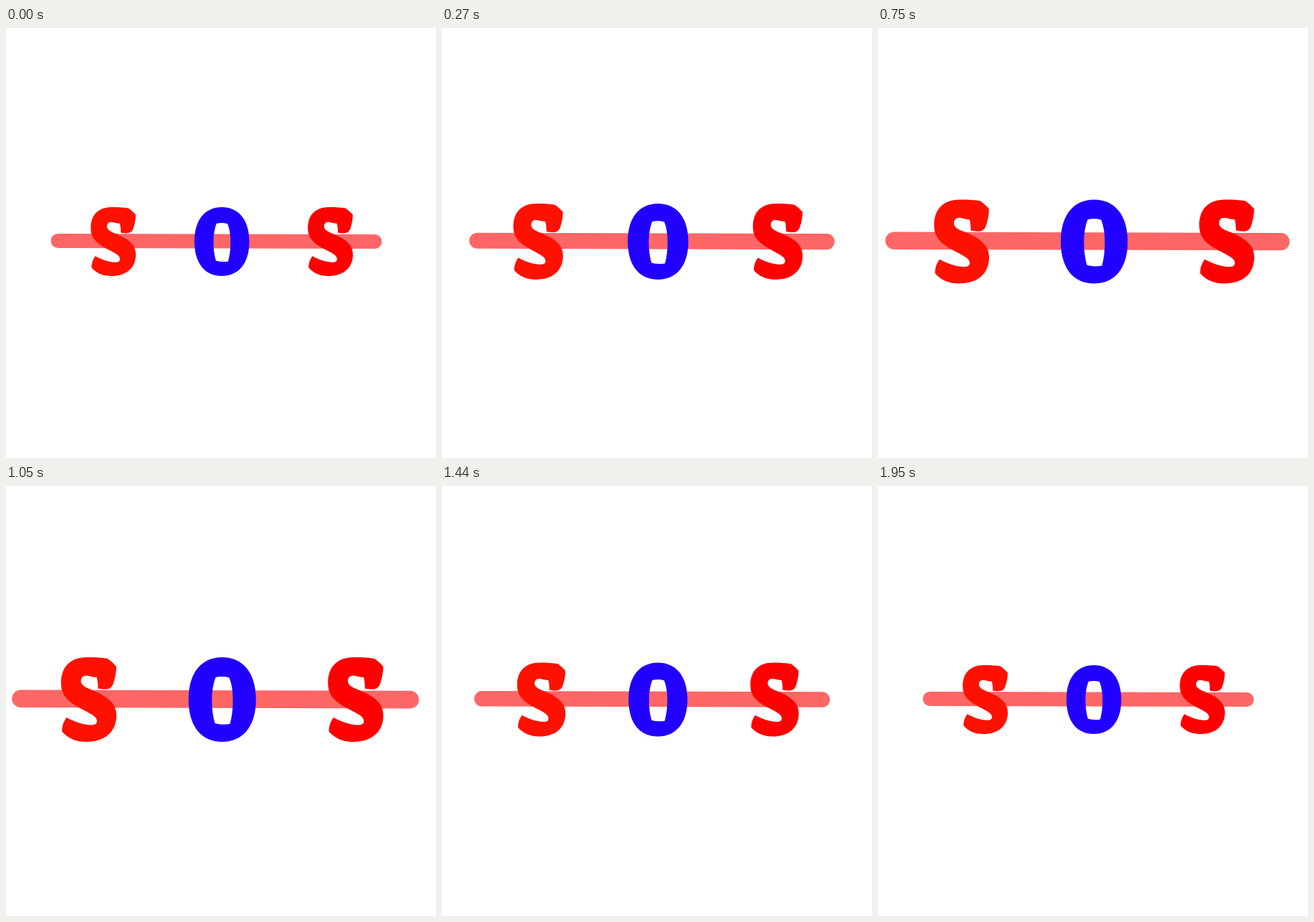
Animation, 600 px wide and 600 px high, one loop 2070 ms. Source, as an HTML page with a canvas:

```html
<!DOCTYPE html>
<html lang="en">
<head>
<meta charset="utf-8">
<title>SOS</title>
<style>
html, body { margin: 0; width: 100%; height: 100%; overflow: hidden; background: #fff; }
canvas { display: block; width: 600px; height: 600px; }
</style>
</head>
<body>
<canvas id="stage" width="600" height="600"></canvas>
<script>
const ctx = document.getElementById('stage').getContext('2d');
const LOOP = 2070, HALF = LOOP / 2, STEP = 30, REST = 1950, LEAD = 7;
const GROWTH = 0.232, PEAK = 1.23;
const CX = 299, CY = 298;

// Letter shapes at their largest size
const S = new Path2D(`M112 239 C123 238.8 134 239.5 141.5 240.8
  C146 244 150 247.5 153.8 252 C154 260 152 269 149.5 276
  C147.5 281.5 144 283.5 139 283.6 C135 283.7 132 283.3 128.3 282.5
  C128.3 277 127.8 272 126.6 267 C120 266.4 116 265 112 264.4
  C107 264.4 104.5 268 104.5 272 C104.5 277.5 110 280.5 117 283.5
  C138 292 154 301 154 320 C154 343 138 357 112 357
  C96 357 85 351 78 342.5 C78 335 80 329 84.5 323
  C95 329 107 333 118 333.6 C123 333.6 126.8 332.5 126.8 328
  C126.8 322 119 318.5 110 313.5 C92 304 76.7 296 76.7 275
  C76.7 252 90 239.3 112 239 Z`);

const O = new Path2D(`M301.7 239 C330 239 348.8 260 348.8 298
  C348.8 336 330 357 301.7 357 C273 357 254.7 336 254.7 298
  C254.7 260 273 239 301.7 239 Z
  M292.5 267 C289 276 287.3 287 287.3 299 C287.3 311 288.8 322 291.5 331
  C297 332.8 306 333.4 312.5 332 C315.3 322 316.6 311 316.6 299
  C316.6 287 315 276 311.5 267.5 C306 265.8 298 265.6 292.5 267 Z`);

function bezier(a, b, u) {
  const v = 1 - u;
  return 3 * v * v * u * a + 3 * v * u * u * b + u * u * u;
}

function ease(p) {
  let lo = 0, hi = 1;
  for (let i = 0; i < 30; i++) {
    const mid = (lo + hi) / 2;
    if (bezier(0.25, 0.25, mid) < p) lo = mid; else hi = mid;
  }
  return bezier(0.1, 1, lo);
}

function scaleAt(time) {
  const t = Math.floor((time % LOOP) / STEP) * STEP;
  if (t === 0 || t >= REST) return 1;
  const u = t + LEAD;
  const level = u < HALF ? ease(u / HALF) : 1 - ease(u / HALF - 1);
  return 1 + GROWTH * level;
}

function letter(path, color, dx = 0) {
  ctx.save();
  ctx.translate(dx, 0);
  ctx.fillStyle = color;
  ctx.fill(path, 'evenodd');
  ctx.restore();
}

function bar() {
  ctx.strokeStyle = '#ff6666';
  ctx.lineWidth = 24.6;
  ctx.lineCap = 'round';
  ctx.beginPath();
  ctx.moveTo(20.5, 296.7);
  ctx.lineTo(564, 298.1);
  ctx.stroke();
}

function draw(time) {
  ctx.fillStyle = '#fff';
  ctx.fillRect(0, 0, 600, 600);
  const k = scaleAt(time) / PEAK;
  ctx.save();
  ctx.translate(CX, CY);
  ctx.scale(k, k);
  ctx.translate(-CX, -CY);
  bar();
  letter(S, '#ff1100');
  letter(O, '#2200ff');
  letter(S, '#ff0000', 372.6);
  ctx.restore();
}

const start = performance.now();
function tick() {
  draw(performance.now() - start);
  requestAnimationFrame(tick);
}
tick();
</script>
</body>
</html>
```
